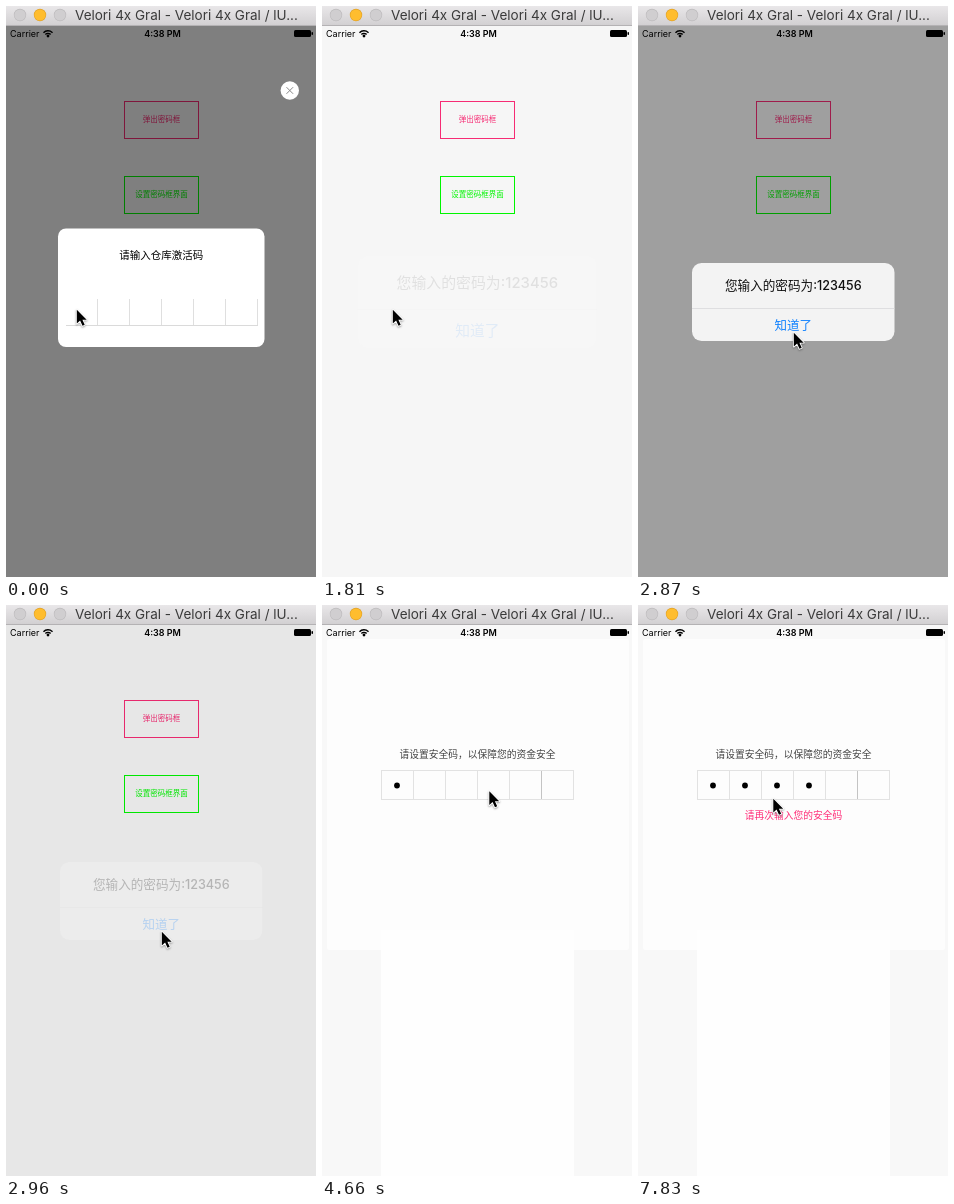
An HTML page with a canvas for the animation above (8000 ms loop, 310 by 571 pixels).

```html
<!DOCTYPE html>
<html lang="zh-CN">
<head>
<meta charset="utf-8">
<style>
html, body { margin: 0; width: 100%; height: 100%; overflow: hidden; }
canvas { display: block; }
</style>
</head>
<body>
<canvas id="stage" width="310" height="571"></canvas>
<script>
const c = document.getElementById('stage').getContext('2d');
const LOOP = 8000, PINK = '#ff2d78', GREEN = '#00ff00', BLUE = '#007aff';
const ALERT_IN = 1792, ALERT_OUT = 2856, SLIDE = 3765;
const FONT = 'Inter, "Noto Sans CJK SC", "Noto Sans CJK", sans-serif';

// Pointer stops: time, x, y; it rests wherever two stops agree.
const stops = [
  [0, 70.5, 303], [2200, 70.5, 303], [2610, 155.5, 326], [2990, 155.5, 326],
  [3430, 167, 185.5], [6590, 167, 185.5], [6860, 132.5, 191], [7180, 132.5, 191],
  [7300, 133.5, 192], [7450, 133.5, 192], [7560, 135, 193], [LOOP, 135, 193]
];

const clamp = v => Math.min(1, Math.max(0, v));
const count = (times, t) => times.filter(s => t >= s).length;

// Critically damped spring from 0 to 1
function spring(t, rate) {
  const x = Math.max(0, t) * rate;
  return 1 - (1 + x) * Math.exp(-x);
}

function rect(x, y, w, h, color) {
  c.fillStyle = color;
  c.fillRect(x, y, w, h);
}

function round(x, y, w, h, r, color) {
  c.fillStyle = color;
  c.beginPath();
  c.roundRect(x, y, w, h, r);
  c.fill();
}

function disc(x, y, r, color) {
  c.fillStyle = color;
  c.beginPath();
  c.arc(x, y, r, 0, 7);
  c.fill();
}

function text(s, x, mid, size, color, weight = 400, align = 'center') {
  c.font = `${weight} ${size}px ${FONT}`;
  c.textAlign = align;
  c.fillStyle = color;
  c.fillText(s, x, mid + size * 0.37);
}

function titleBar() {
  const g = c.createLinearGradient(0, 0, 0, 20);
  g.addColorStop(0, '#e9e7e9');
  g.addColorStop(1, '#d1cfd1');
  rect(0, 0, 310, 20, g);
  rect(0, 19, 310, 1, '#b4b2b4');
  [['#d0ced0', '#bcbabc'], ['#ffbd2e', '#e0a128'], ['#d0ced0', '#bcbabc']].forEach(([fill, edge], i) => {
    disc(14 + 20 * i, 9, 6.2, edge);
    disc(14 + 20 * i, 9, 5.6, fill);
  });
  text('Velori 4x Gral - Velori 4x Gral / lU...', 69, 9.5, 13.5, '#3a3a3a', 400, 'left');
}

function statusBar() {
  text('Carrier', 4, 28, 9, '#000', 400, 'left');
  text('4:38 PM', 156.5, 28, 9, '#000', 600);
  c.strokeStyle = '#000';
  c.lineWidth = 1.4;
  for (const r of [3.6, 6.2]) {
    c.beginPath();
    c.arc(42, 31, r, -Math.PI * 0.76, -Math.PI * 0.24);
    c.stroke();
  }
  disc(42, 30, 1.4, '#000');
  round(288, 24, 17, 7, 1.5, '#000');
  round(305.5, 26, 1.5, 3, 0.7, '#000');
}

function button(label, y, color) {
  c.strokeStyle = color;
  c.lineWidth = 1;
  c.strokeRect(118.5, y + 0.5, 74, 37);
  text(label, 155.5, y + 18.7, 7.5, color);
}

function dots(n, x, y, r) {
  for (let i = 0; i < n; i++) disc(x + 32 * i, y, r, '#000');
}

function codeDialog(t) {
  rect(0, 20, 310, 551, 'rgba(0,0,0,.5)');
  disc(283.8, 84.5, 9.2, '#fff');
  c.strokeStyle = '#888';
  c.lineWidth = 1;
  c.beginPath();
  c.moveTo(280.5, 81.2); c.lineTo(287.1, 87.8);
  c.moveTo(287.1, 81.2); c.lineTo(280.5, 87.8);
  c.stroke();
  round(52, 222.5, 206.5, 118.5, 8, '#fff');
  text('请输入仓库激活码', 155.2, 249, 10.5, '#000');
  for (let x = 91; x < 260; x += 32) rect(x, 293, 1, 26, '#dfdfdf');
  rect(60, 319, 192, 1, '#dadada');
  dots(count([230, 470, 790, 1060, 1480], t), 75.5, 305.8, 3.3);
}

function alertBox(alpha, scale) {
  c.save();
  c.globalAlpha = alpha;
  c.translate(155.3, 296);
  c.scale(scale, scale);
  c.translate(-155.3, -296);
  round(54, 257, 202.5, 78, 9.5, '#f9f9f9');
  rect(54, 302, 202.5, 0.8, '#d8d8da');
  text('您输入的密码为:123456', 155.3, 279.7, 12.6, '#000', 500);
  text('知道了', 155.3, 319.8, 12.5, BLUE);
  c.restore();
}

function setupScreen(t, off) {
  c.save();
  c.translate(0, off);
  text('请设置安全码，以保障您的资金安全', 155.5, 149, 9.75, '#444');
  c.strokeStyle = '#e2e2e2';
  c.lineWidth = 1;
  c.strokeRect(59.5, 165.5, 192, 29);
  for (let x = 91; x < 230; x += 32) rect(x, 166, 1, 28, x === 219 ? '#c4c4c4' : '#e2e2e2');
  const again = t >= 6120;
  const keys = again ? [7000, 7180, 7450, 7830] : [4660, 4960, 5260, 5590, 5830];
  dots(count(keys, t), 75, 180.5, 2.9);
  if (again) text('请再次输入您的安全码', 155.5, 210.8, 9.75, PINK);
  c.restore();
}

function pointer(t) {
  const i = stops.findIndex(s => s[0] > t);
  const [t0, x0, y0] = stops[i - 1], [t1, x1, y1] = stops[i];
  const u = clamp((t - t0) / (t1 - t0)), e = u * u * (3 - 2 * u);
  c.save();
  c.translate(x0 + (x1 - x0) * e, y0 + (y1 - y0) * e);
  const arrow = new Path2D('M.3 .8V14.6L3.6 11.6L6 16.8L8.2 15.8L5.9 10.7H10.2Z');
  c.lineJoin = 'round';
  c.strokeStyle = '#fff';
  c.lineWidth = 1.8;
  c.shadowColor = 'rgba(0,0,0,.35)';
  c.shadowBlur = 2;
  c.shadowOffsetY = 1;
  c.stroke(arrow);
  c.shadowColor = 'transparent';
  c.fillStyle = '#000';
  c.fill(arrow);
  c.restore();
}

function draw(t) {
  const dialog = t < 1810;
  const shown = dialog ? 0 : spring(t - ALERT_IN, 0.0265) * (1 - spring(t - ALERT_OUT, 0.0265));
  const off = 551 * (1 - spring(t - SLIDE, 0.017));
  const sliding = t > SLIDE;

  rect(0, 0, 310, 571, '#fff');
  c.save();
  c.beginPath();
  c.rect(0, 20, 310, sliding ? off : 551);
  c.clip();
  button('弹出密码框', 95, PINK);
  button('设置密码框界面', 170, GREEN);
  c.restore();
  statusBar();

  if (dialog) codeDialog(t);
  else {
    // The dimming never clears fully outside the central area.
    const dim = 0.4 * shown;
    const base = Math.max(dim, 0.027), inner = Math.max(dim, 0.008);
    c.fillStyle = `rgba(0,0,0,${t > ALERT_OUT ? inner : base})`;
    c.fillRect(0, 20, 310, 551);
    if (t > ALERT_OUT && base > inner) {
      c.beginPath();
      c.rect(0, 20, 310, 551);
      c.roundRect(5, 34, 302, 311, 3);
      c.fillStyle = `rgba(0,0,0,${base - inner})`;
      c.fill('evenodd');
    }
    if (shown > 0.002) {
      const scale = t < ALERT_OUT ? 1.2 - 0.2 * spring(t - ALERT_IN, 0.0265) : 1;
      alertBox(shown, scale);
    }
    if (sliding) {
      const top = Math.max(325, 145 + off);
      rect(59, top, 193, Math.max(0, 571 - top), '#fefefe');
      setupScreen(t, off);
    }
  }
  titleBar();
  pointer(t);
}

const start = performance.now();
function tick() {
  draw((performance.now() - start) % LOOP);
  requestAnimationFrame(tick);
}
tick();
</script>
</body>
</html>
```
